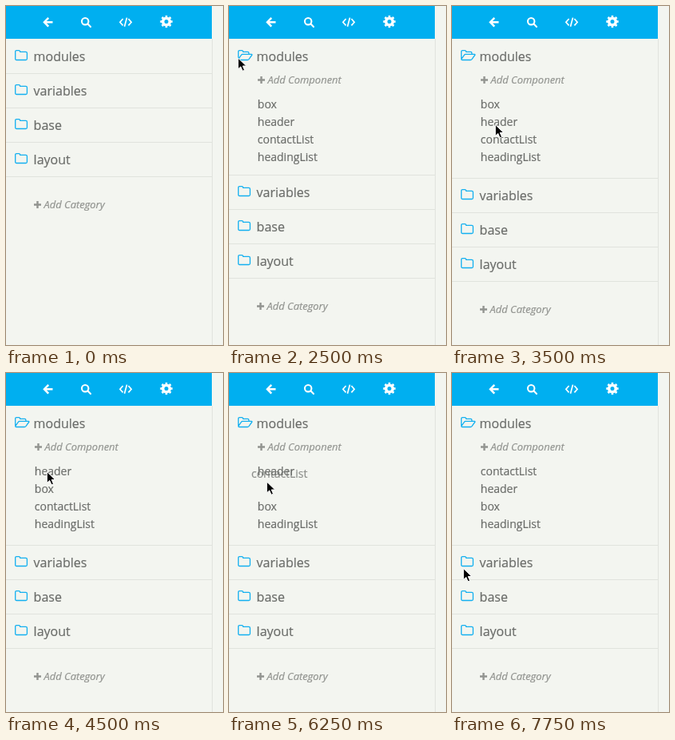
These frames come from a looping animation (272x424 px, 8 s). An HTML page:

```html
<!DOCTYPE html>
<html lang="en">
<head>
<meta charset="utf-8">
<title>Category sidebar</title>
<style>
  html, body { margin: 0; width: 100%; height: 100%; overflow: hidden; background: #f3f5f0; }
  svg { display: block; font-family: "Open Sans", sans-serif; fill: #6b6d6a; }
  text { stroke: currentColor; stroke-width: .2; color: #6b6d6a; }
  .category { font-size: 16px; }
  .item { font-size: 14px; }
  .add { font-size: 13px; font-style: italic; fill: #929490; color: #929490; }
  .rule { fill: #e0e3dd; }
  .line { fill: none; stroke: #13b0f0; stroke-width: 1.3; stroke-linejoin: round; }
  .white { fill: none; stroke: #fff; }
</style>
</head>
<body>
<svg width="272" height="424" viewBox="0 0 272 424">
  <defs>
    <path id="closed" class="line" d="M.7 2.2Q.7.7 2.2.7H5.2Q6.7.7 6.7 2.4H13.8Q15.4 2.4 15.4 4V11Q15.4 12.5 13.9 12.5H2.2Q.7 12.5.7 11Z"/>
    <path id="opened" class="line" d="M.7 11V2.2Q.7.7 2.2.7H5.2Q6.7.7 6.7 2.4H12.4Q13.9 2.4 13.9 4V5.4M.8 11.3 4.5 6.2Q5 5.4 6 5.4H17.2Q18.4 5.4 17.6 6.5L13.9 11.6Q13.2 12.5 12.2 12.5H2Q.6 12.5.8 11.3Z"/>
    <path id="plus" d="M3.3 0h2.4v3.3H9v2.4H5.7V9H3.3V5.7H0V3.3H3.3Z" fill="#929490"/>
  </defs>

  <rect class="rule" x="258" y="41" width="1" height="383"/>
  <rect width="258" height="41" fill="#00aff0"/>
  <path class="white" stroke-width="2.5" d="M53.2 14.8 48 20.2 53.2 25.6M48.5 20.2H58.5"/>
  <g class="white" stroke-width="2.1">
    <circle cx="99.2" cy="19.2" r="4.2"/>
    <path stroke-linecap="round" d="M102.6 22.6 106 26"/>
  </g>
  <path class="white" stroke-width="1.7" d="M146.6 16 142.9 20.2 146.6 24.4M153.4 16 157.1 20.2 153.4 24.4M151.5 14.6 148.5 25.8"/>
  <g class="white">
    <circle cx="201" cy="19.5" r="4.3" stroke-width="3.6"/>
    <circle cx="201" cy="19.5" r="6.4" stroke-width="2.6" pathLength="16" stroke-dasharray="1 1" stroke-dashoffset=".5"/>
  </g>

  <use id="firstFolder" x="11" y="55"/>
  <text class="category" x="34.6" y="69">modules</text>
  <g id="contents">
    <use href="#plus" x="36" y="88"/>
    <text class="add" x="48.5" y="97">Add Component</text>
    <g id="items"></g>
  </g>
  <g id="below">
    <rect class="rule" y="84" width="258" height="1"/>
    <g id="categories"></g>
    <use href="#plus" x="35" y="244"/>
    <text class="add" x="47.5" y="253">Add Category</text>
  </g>
  <g id="dragged" opacity=".75"></g>
  <path id="cursor" d="M.8 1V15L4.2 11.9 6.5 17.3 9 16.2 6.700 11H11.2Z" fill="#000" stroke="#fff"/>
</svg>
<script>
const LOOP = 8000, STEP = 250;
const el = id => document.getElementById(id);
const label = (text, x, y) => `<text class="item" x="${x}" y="${y}">${text}</text>`;
const smooth = p => p * p * (3 - 2 * p);

el("categories").innerHTML = ["variables", "base", "layout"].map((name, i) => {
  const y = 43 * i;
  return `<use href="#closed" x="11" y="${98 + y}"/>
    <text class="category" x="34.6" y="${112 + y}">${name}</text>
    <rect class="rule" y="${127 + y}" width="258" height="1"/>`;
}).join("");

// Pointer glides, each from where the last one ended.
const glides = [
  { from: 600, to: 1150, x: 10.5, y: 64 },    // first folder
  { from: 2750, to: 3500, x: 53.5, y: 147.5 }, // "header"
  { from: 3900, to: 4250, x: 51, y: 114 },    // drag to the top
  { from: 4250, to: 4500, x: 50.5, y: 122.5 },
  { from: 4700, to: 5400, x: 53.5, y: 170.5 }, // "contactList"
  { from: 6000, to: 6250, x: 46.5, y: 135 },  // drag to the top
  { from: 6500, to: 6750, x: 46.5, y: 127 },
  { from: 7000, to: 7250, x: 12, y: 57 },
  { from: 7250, to: 7500, x: 31, y: 226 },
  { from: 7500, to: 7750, x: 13.5, y: 243.5 }  // second folder
];

function pointerAt(time) {
  let x = 119, y = 64;
  for (const glide of glides) {
    if (time <= glide.from) break;
    const p = smooth(Math.min(1, (time - glide.from) / (glide.to - glide.from)));
    x += (glide.x - x) * p;
    y += (glide.y - y) * p;
  }
  return { x, y };
}

// Each dragged item ends up first; grip is its baseline relative to the pointer.
const drags = [
  { name: "header", from: 4250, to: 4500, grip: 1 },
  { name: "contactList", from: 6250, to: 7000, grip: -4.5 }
];

function listAt(time) {
  const items = ["box", "header", "contactList", "headingList"];
  let held = null;
  for (const { name, from, to, grip } of drags) {
    if (time < from) break;
    const home = items.indexOf(name);
    const climbed = 1 + Math.floor((time - from) / STEP);
    const dragging = time < to;
    items.splice(home, 1);
    items.splice(Math.max(0, home - climbed), 0, dragging ? "" : name);
    if (dragging) held = { name, grip };
  }
  return { items, held };
}

function draw(time) {
  const shift = time < 2500 ? 0 : time < 2750 ? 127 : 131;
  const { x, y } = pointerAt(time);
  const { items, held } = listAt(time);
  el("firstFolder").setAttribute("href", shift ? "#opened" : "#closed");
  el("contents").setAttribute("visibility", shift ? "visible" : "hidden");
  el("below").setAttribute("transform", `translate(0 ${shift})`);
  el("items").innerHTML = items.map((name, i) => label(name, 35.8, 128 + 22 * i)).join("");
  el("dragged").innerHTML = held ? label(held.name, x - 18.5, y + held.grip) : "";
  el("cursor").setAttribute("visibility", time < 750 ? "hidden" : "visible");
  el("cursor").setAttribute("transform", `translate(${x} ${y})`);
}

const start = performance.now();
let shownTime = -1;
function tick() {
  const elapsed = (performance.now() - start) % LOOP;
  const time = Math.floor(elapsed / STEP) * STEP;
  if (time !== shownTime) draw(shownTime = time);
  requestAnimationFrame(tick);
}
tick();
</script>
</body>
</html>
```
